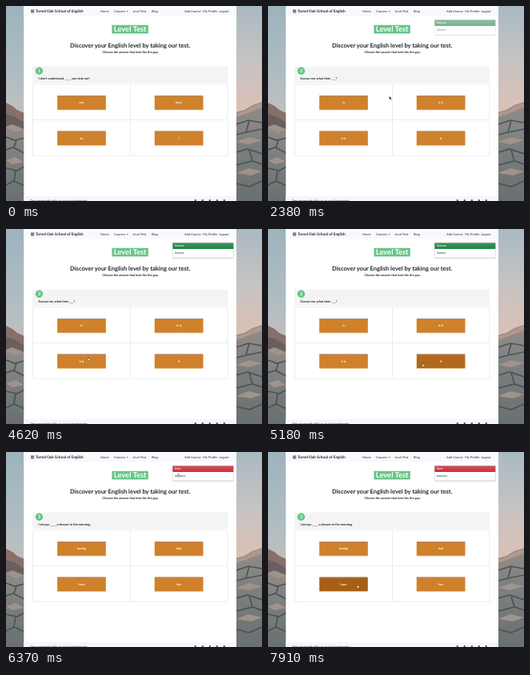
These frames come from a looping animation (320 by 244 pixels, 8 s). An HTML page:

```html
<!DOCTYPE html>
<html lang="en">
<head>
<meta charset="utf-8">
<title>Level Test</title>
<style>
  html, body { margin: 0; width: 100%; height: 100%; overflow: hidden; background: #fff; }
  svg { display: block; width: 100%; height: 100%; }
  text { font-family: Lato, "Open Sans", sans-serif; fill: #212529; text-rendering: geometricPrecision; }
  .b { font-weight: 700; }
  .mid { text-anchor: middle; }
  .nav { font-size: 4px; font-weight: 500; fill: #3c4247; }
  .label { font-size: 3.8px; font-weight: 700; fill: #fff; text-anchor: middle; }
</style>
</head>
<body>
<svg viewBox="0 0 320 244" preserveAspectRatio="none">
  <defs>
    <linearGradient id="skyL" x2="0" y2="1">
      <stop offset="0" stop-color="#9db3bd"/>
      <stop offset=".6" stop-color="#b0bdc2"/>
      <stop offset="1" stop-color="#c8bfbc"/>
    </linearGradient>
    <linearGradient id="skyR" x2="0" y2="1">
      <stop offset="0" stop-color="#a9bac2"/>
      <stop offset=".5" stop-color="#c8c3c2"/>
      <stop offset="1" stop-color="#e2bfb1"/>
    </linearGradient>
    <linearGradient id="rock" x2="0" y2="1">
      <stop offset="0" stop-color="#948c88"/>
      <stop offset=".4" stop-color="#7c8080"/>
      <stop offset="1" stop-color="#69706f"/>
    </linearGradient>
    <linearGradient id="success" x2="0" y2="1">
      <stop offset="0" stop-color="#36985a"/><stop offset="1" stop-color="#1f8446"/>
    </linearGradient>
    <linearGradient id="error" x2="0" y2="1">
      <stop offset="0" stop-color="#df4a56"/><stop offset="1" stop-color="#c92f3c"/>
    </linearGradient>
  </defs>

  <!-- backdrop -->
  <rect width="23" height="150" fill="url(#skyL)"/>
  <rect x="287" width="33" height="150" fill="url(#skyR)"/>
  <path d="M0 121 L8 125 L14 130 L23 134 V160 H0Z" fill="#87706a"/>
  <path d="M0 135 L10 138 L23 146 V160 H0Z" fill="#695f60"/>
  <path d="M0 151 L8 148 L23 154 V244 H0Z" fill="url(#rock)"/>
  <path d="M287 133 L298 130 L308 124 L320 120 V244 H287Z" fill="url(#rock)"/>
  <path d="M288 134 L299 131 L309 125 L320 121 V127 L307 132 L288 139Z" fill="#b2978b"/>
  <path d="M0 152 L8 149 L22 155 L12 158Z M0 193 L12 189 L22 195 L8 198Z M288 170 L304 164 L320 168 L303 173Z M288 209 L303 203 L320 207 L306 212Z"
        fill="#a2938a"/>
  <path d="M0 164 L11 168 L23 165 M0 180 L9 177 L23 184 M13 168 L10 177 M0 203 L14 206 L23 201 M0 224 L10 219 L23 225 M12 206 L10 219
           M288 148 L303 143 L320 146 M288 161 L300 158 L320 154 M304 143 L300 158 M288 183 L302 179 L320 185 M288 199 L308 194 L320 198 M304 180 L308 194 M288 222 L304 226 L320 219"
        fill="none" stroke="#4c5355" stroke-width="1.7"/>

  <!-- page -->
  <rect x="22.3" width="265.7" height="244" fill="#fff"/>
  <rect x="22.3" width="265.7" height="12.5" fill="#f8f9fa"/>
  <rect x="31" y="4.4" width="4.2" height="4.2" fill="#7d8286"/>
  <text x="37" y="8" class="b" font-size="4.75">Tarnel Oak School of English</text>
  <g id="nav"></g>
  <path d="M150.6 5.9h2.2l-1.1 1.3z" fill="#444a50"/>
  <rect x="132.4" y="23.8" width="45.4" height="10.6" fill="#66c587"/>
  <text x="155.2" y="32.2" class="b mid" font-size="9.4" style="fill:#fff">Level Test</text>
  <text x="155.2" y="52.1" class="b mid" font-size="7.5">Discover your English level by taking our test.</text>
  <text x="155.6" y="59.4" class="b mid" font-size="3.87">Choose the answer that best fits the gap.</text>

  <rect x="33" y="75.5" width="244" height="20.5" fill="#f4f4f4"/>
  <circle cx="41.5" cy="81.2" r="4.7" fill="#66c587"/>
  <text id="num" x="41.5" y="83.2" class="b mid" font-size="5.6" style="fill:#fff"></text>
  <text id="question" x="40.5" y="91.5" class="b" font-size="3.9"></text>
  <path d="M33.5 97.7H277V187.2H33.5ZM33.5 142.5H277M155.5 97.7V187.2"
        fill="none" stroke="#e3e6e9" stroke-width=".7"/>
  <g id="buttons"></g>

  <rect x="22.3" y="238" width="265.7" height="6" fill="#f5f6f7"/>
  <text x="30" y="245" font-size="3.9">Get connected with us on social networks:</text>
  <g id="icons" fill="#555a5f"></g>

  <g id="status">
    <rect x="22.3" y="239.4" width="88.7" height="5" fill="#dcdddf"/>
    <text x="23.5" y="243" font-size="3" style="fill:#666">Waiting for tarnel.example...</text>
  </g>

  <g id="toast">
    <rect x="207.8" y="18" width="77.2" height="19" rx="1" fill="#000" opacity=".14"/>
    <rect x="208.3" y="17.2" width="76" height="18.6" rx=".8" fill="#fff" stroke="#d8d8d8" stroke-width=".4"/>
    <rect id="head" x="208.3" y="17.2" width="76" height="7.8" rx=".6"/>
    <rect x="208.3" y="17" width="76" height=".9" fill="#a39a9a"/>
    <text id="kind" x="211" y="22.4" class="b" font-size="3.4" style="fill:#fff"></text>
    <text id="note" x="211" y="31.4" font-size="3.3" font-weight="600"></text>
  </g>

  <g id="cursor">
    <path id="arrow" d="M0 0V4.6L1.1 3.7L1.9 5.4L2.7 5L1.9 3.4H3.3Z" fill="#111" stroke="#fff" stroke-width=".4"/>
    <path id="hand" d="M-.4 .3Q0 -.3 .4 .3V1.6L1.9 1.9Q2.4 2.1 2.2 2.8L1.8 4H-.5L-1.4 2.6Q-1.4 1.9 -.4 2.4Z"
          fill="#fff" stroke="#222" stroke-width=".45"/>
  </g>
</svg>

<script>
const LOOP = 8000, STEP = 70, FADE = 140;
const $ = id => document.getElementById(id);

function add(parent, tag, attrs, text = "") {
  const el = document.createElementNS("http://www.w3.org/2000/svg", tag);
  for (const key in attrs) el.setAttribute(key, attrs[key]);
  el.textContent = text;
  return parent.appendChild(el);
}

const links = [[118, "Home"], [135, "Courses"], [158.4, "Level Test"], [182, "Blog"],
  [223, "Add Course"], [246.3, "My Profile"], [266.4, "Logout"]];
for (const [x, name] of links)
  add($("nav"), "text", { x, y: 7.8, class: name === "Level Test" ? "nav b" : "nav" }, name);

for (let i = 0; i < 5; i++) add($("icons"), "circle", { cx: 236.8 + 9 * i, cy: 243.3, r: 1.2 });

const buttons = [[64.2, 112.2], [185.8, 112.2], [64.2, 156.7], [185.8, 156.7]].map(([x, y]) => {
  const g = $("buttons");
  add(g, "rect", { x: x - .2, y, width: 61, height: 18, rx: .7, fill: "#e3b06c" });
  const face = add(g, "rect", { x: x + .2, y, width: 60.2, height: 17.4, rx: .5 });
  add(g, "rect", { x, y: y - .1, width: 60.6, height: .9, rx: .4, fill: "#a88a7c" });
  const label = add(g, "text", { x: x + 30.3, y: y + 10.1, class: "label" });
  return { face, label };
});

const pages = [
  { from: 0, ask: "I don't understand, ____ you help me?", answers: ["can", "have", "do", "I"] },
  { from: 1960, ask: "Excuse me, what time ___?", answers: ["is", "is it", "it is", "it"] },
  { from: 5320, ask: "I always ____ a shower in the morning.", answers: ["having", "had", "have", "has"] }
];

// button, pointer enters, pointer leaves
const hovers = [[0, 1400, 1960], [2, 4620, 4900], [3, 5080, 6090], [0, 7280, 7420], [2, 7700, 8200]];

const toasts = [
  { from: 2170, fade: 350, to: 5320, kind: "Success", note: "Correct", fill: "url(#success)" },
  { from: 6090, fade: 250, to: LOOP, kind: "Error", note: "Incorrect", fill: "url(#error)" }
];

// time, x, y
const path = [
  [840, 169, 9], [1400, 102, 115.6], [1960, 102, 115.6], [2380, 151.5, 112.5], [2620, 151.5, 112.5],
  [3150, 226, 48], [3570, 226, 48], [4060, 63, 92], [4340, 92, 107], [4620, 103, 160.6],
  [4830, 103, 160.6], [5180, 193.7, 168], [6020, 193.7, 168], [6340, 215.5, 27],
  [6790, 215.5, 27], [7140, 66, 90], [7320, 104, 119], [7560, 178, 126], [7840, 112, 166]
];

const clamp = v => Math.max(0, Math.min(1, v));
const ease = v => v * v * (3 - 2 * v);
const mix = (a, b, k) => a + (b - a) * k;
const shade = (a, b, k) => `rgb(${a.map((v, i) => Math.round(mix(v, b[i], k)))})`;

function pointAt(t) {
  const i = path.findIndex(p => p[0] > t);
  if (i < 0) return path[path.length - 1].slice(1);
  if (i === 0) return path[0].slice(1);
  const [t0, x0, y0] = path[i - 1], [t1, x1, y1] = path[i];
  const k = ease((t - t0) / (t1 - t0));
  return [mix(x0, x1, k), mix(y0, y1, k)];
}

function draw(t) {
  const n = pages.filter(p => p.from <= t).length;
  const page = pages[n - 1];
  $("num").textContent = n;
  $("question").textContent = page.ask;

  // the toast is clickable too
  let over = t >= 6300 && t < 6800;
  buttons.forEach(({ face, label }, i) => {
    let dark = 0;
    for (const [b, start, end] of hovers) {
      if (b !== i) continue;
      dark = Math.max(dark, Math.min(clamp((t - start) / FADE), clamp(1 - (t - end) / FADE)));
      if (t >= start && t < end) over = true;
    }
    face.setAttribute("fill", shade([208, 129, 43], [166, 95, 20], dark));
    label.textContent = page.answers[i];
  });

  const toast = toasts.find(o => t >= o.from && t < o.to);
  $("toast").setAttribute("opacity", toast ? clamp((t - toast.from) / toast.fade) : 0);
  if (toast) {
    $("head").setAttribute("fill", toast.fill);
    $("kind").textContent = toast.kind;
    $("note").textContent = toast.note;
  }

  $("status").setAttribute("visibility", t >= 5600 && t < 6090 ? "visible" : "hidden");

  const [x, y] = pointAt(t);
  $("cursor").setAttribute("transform", `translate(${x} ${y})`);
  $("cursor").setAttribute("opacity", t < 840 ? 0 : 1);
  $("arrow").setAttribute("opacity", over ? 0 : 1);
  $("hand").setAttribute("opacity", over ? 1 : 0);
}

function tick() {
  const t = performance.now() % LOOP;
  draw(Math.floor(t / STEP) * STEP);
  requestAnimationFrame(tick);
}
tick();
</script>
</body>
</html>
```
